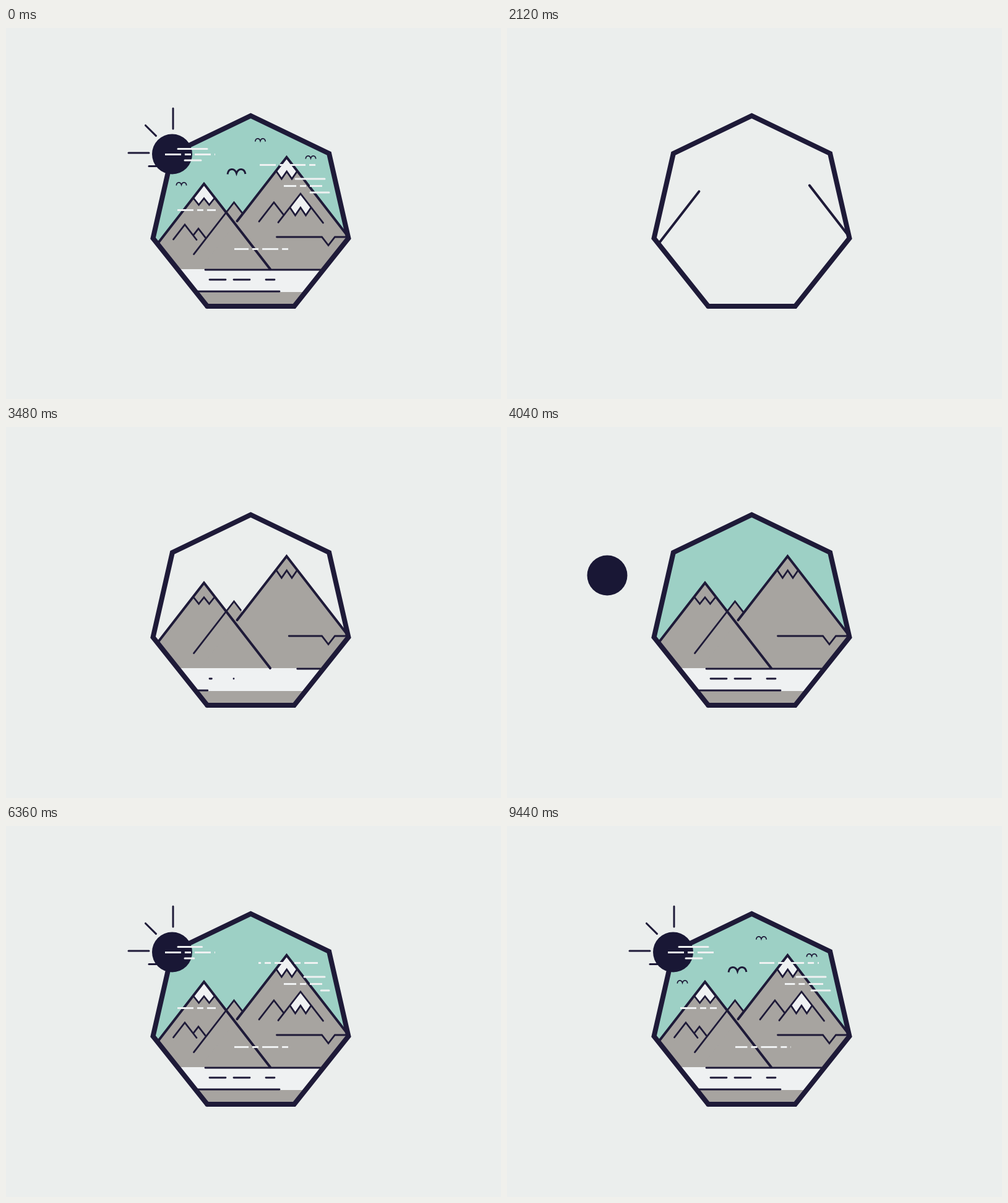
An HTML page with a canvas for the animation above (9.48 s loop, 800 by 600 pixels).

```html
<!DOCTYPE html>
<html lang="en">
<head>
<meta charset="utf-8">
<title>Mountain badge</title>
<style>
  html, body { margin: 0; width: 100%; height: 100%; overflow: hidden; background: #ebeeed; }
  canvas { display: block; }
</style>
</head>
<body>
<canvas id="stage" width="800" height="600"></canvas>
<script>
const ctx = document.getElementById('stage').getContext('2d');
const LOOP = 9480, CUT = 120;
const BG = '#ebeeed', INK = '#1e1a38', SUN = '#191735';
const ROCK = '#a7a4a0', SKY = '#9dd0c5', WHITE = '#eff1f2';
const SLOPE = 1.29, THICK = 4, THIN = 2.8;
const DASHES = [26, 6, 10, 6], PERIOD = 48;

const clamp = v => Math.max(0, Math.min(1, v));
const span = (t, a, b) => clamp((t - a) / (b - a));
const ease = (t, start, time) => { const p = span(t, start, start + time); return p * p * (3 - 2 * p); };
const mix = (a, b, k) => a + (b - a) * k;

// Every ridge shares one slope; left and right are the horizontal reaches.
const peak = (x, y, left, right) => [[x - left, y + left * SLOPE], [x, y], [x + right, y + right * SLOPE]];
const zigzag = (x, y, step, depth) => [-2, -1, 0, 1, 2].map(i => [x + i * step, y + (i % 2 ? depth : 0)]);
const level = (y, from, to) => [[from, y], [to, y]];

// Regular heptagon, running clockwise from its lower left corner.
const badge = Array.from({ length: 8 }, (_, i) => {
  const angle = (i + 4) * Math.PI * 2 / 7;
  return [395.5 + 162 * Math.sin(angle), 304 - 162 * Math.cos(angle)];
});

const summits = [[320, 252], [453.5, 209], [476, 268]];
const snowEdges = [zigzag(320, 275.5, 8.4, 10.5), zigzag(453.7, 232, 8.3, 12), zigzag(476, 290.5, 8.5, 12.5)];

function trace(points, dy = 0) {
  ctx.beginPath();
  points.forEach(([x, y], i) => i ? ctx.lineTo(x, y + dy) : ctx.moveTo(x, y + dy));
}

function fill(points, color, dy = 0) {
  trace(points, dy);
  ctx.closePath();
  ctx.fillStyle = color;
  ctx.fill();
}

function clipped(points, draw) {
  ctx.save();
  trace(points);
  ctx.clip();
  draw();
  ctx.restore();
}

function pathLength(points) {
  return points.slice(1).reduce((sum, [x, y], i) => sum + Math.hypot(x - points[i][0], y - points[i][1]), 0);
}

// Strokes the part of a polyline between two fractions of its length.
function strokePart(points, from, to, width, color = INK) {
  if (to <= from) return;
  const total = pathLength(points);
  ctx.save();
  ctx.lineWidth = width;
  ctx.strokeStyle = color;
  ctx.lineCap = 'round';
  if (from > 0 || to < 1) {
    ctx.setLineDash([(to - from) * total, total * 3]);
    ctx.lineDashOffset = -from * total;
  }
  trace(points);
  ctx.stroke();
  ctx.restore();
}

function drawOutline(t) {
  const tail = span(t, 440, 2080);
  const head = tail + tail ** 4;
  if (tail === 1) return strokePart(badge, 0, 1, 8);
  strokePart(badge, tail, Math.min(1, head), 8);
  strokePart(badge, 0, head - 1, 8);
}

function drawLand(t) {
  clipped(badge, () => {
    if (t >= 3320) fill(badge, SKY, 250 * (1 - ease(t, 3320, 780)));
    const sink = 240 * (1 - ease(t, 2360, 620));
    for (const [x, y] of [summits[0], [368.5, 282], summits[1]]) fill(peak(x, y, 400, 400), ROCK, sink);
    ctx.fillStyle = t < 3320 ? BG : WHITE;
    ctx.fillRect(200, 390, 400, 37);
  });
}

function drawSnow(t) {
  snowEdges.forEach((edge, i) => {
    const start = 4400 + i * 210;
    const shape = [...edge, summits[i]];
    if (t > start) clipped(shape, () => fill(shape, WHITE, 36 * (1 - ease(t, start, 600))));
  });
}

function drawLines(t) {
  const grow = (points, width, start, time) => strokePart(points, 0, ease(t, start, time), width);
  grow(peak(320, 252, 75, 107), THICK, 1560, 1385);
  grow(peak(453.5, 209, 80, 100).reverse(), THICK, 1560, 1385);
  grow(snowEdges[0], THIN, 2340, 600);
  grow([...snowEdges[1]].reverse(), THIN, 2340, 600);
  grow(peak(368.5, 282, 65, 14), THIN, 2900, 660);

  const river = [[552, 338], [531.5, 338], [521, 351.5], [510.5, 338], [437.5, 338]];
  grow(river, THIN, 3000, 640);
  grow(level(391, 508, 322), THIN, 3320, 560);
  grow(level(426, 310, 442), THIN, 3360, 560);
  [[329, 26], [368, 26], [420, 14]].forEach(([x, w], i) => grow(level(407, x, x + w), THIN, 3400 + i * 80, 360));

  grow(snowEdges[2], THIN, 4440, 560);
  const ridges = [peak(476, 268, 36, 36.5), peak(433, 282, 24, 16), peak(289, 318, 18.5, 19), peak(311, 324.5, 7.5, 11)];
  ridges.forEach((ridge, i) => grow(ridge, THIN, 4280 + i * 50, 600));
}

function drawBirds(t) {
  const spots = [[372.5, 232], [411, 181], [492.5, 209], [283.5, 252]];
  spots.forEach(([x, y], i) => {
    const shown = ease(t, 7160 + i * 160, 560);
    if (!shown) return;
    const scale = i ? 0.57 : 1;
    ctx.save();
    ctx.translate(x, y);
    ctx.scale(scale, scale);
    ctx.strokeStyle = INK;
    ctx.lineWidth = 3;
    ctx.setLineDash([shown * 44, 200]);
    ctx.beginPath();
    ctx.moveTo(-14.5, 4.5);
    ctx.bezierCurveTo(-13, -6, -3, -6, 0, 3);
    ctx.bezierCurveTo(3, -6, 13, -6, 14.5, 4.5);
    ctx.stroke();
    ctx.restore();
  });
}

function drawRays(t) {
  const shown = ease(t, 6120, 220);
  for (let i = 0; i < 3; i++) {
    const angle = -Math.PI / 2 - i * Math.PI / 4;
    const at = r => [270 + r * Math.cos(angle), 202 + r * Math.sin(angle)];
    strokePart([at(39), at(i === 1 ? 63 : 72)], 0, shown, 3);
  }
  strokePart(level(223.5, 246, 231), 0, shown, 3);
}

function drawSun(t) {
  const size = 1.1 * ease(t, 3600, 240) - 0.1 * ease(t, 3840, 160);
  const u = ease(t, 4330, 1890), v = 1 - u;
  const curve = (a, b, c, d) => a * v ** 3 + 3 * b * u * v * v + 3 * c * u * u * v + d * u ** 3;
  ctx.fillStyle = SUN;
  ctx.beginPath();
  ctx.arc(curve(162, 162, 236, 268.5), curve(240, 150, -13, 204), 32.5 * size, 0, Math.PI * 2);
  ctx.fill();
}

// Dashes slide through a window that opens from one side.
function dashedCloud(t, y, from, to, home, laps) {
  const tip = mix(from, to, ease(t, 4960, 800));
  const left = Math.min(from, tip);
  if (tip === from) return;
  ctx.save();
  ctx.strokeStyle = WHITE;
  ctx.lineWidth = 3;
  ctx.setLineDash(DASHES);
  ctx.lineDashOffset = left - home - laps * PERIOD * (t - LOOP) / 3120;
  trace(level(y, left, Math.max(from, tip)));
  ctx.stroke();
  ctx.restore();
}

function drawClouds(t) {
  dashedCloud(t, 204.5, 257, 338, 257, -5);
  dashedCloud(t, 294.5, 277, 339, 277, -5);
  dashedCloud(t, 221.5, 504, 408, 410, 6.5);
  dashedCloud(t, 255.5, 511, 449, 443, 6);
  dashedCloud(t, 357.5, 459, 369, 366, 6);
  const solid = [level(195.5, 278, 325), level(244, 515, 468), level(214, 289, 315), level(266, 522, 492)];
  solid.forEach((line, i) => strokePart(line, 0, ease(t, 5850 + i * 65, 700), 3, WHITE));
}

function draw(t) {
  ctx.fillStyle = BG;
  ctx.fillRect(0, 0, 800, 600);
  for (const layer of [drawLand, drawSnow, drawLines, drawBirds, drawOutline, drawRays, drawSun, drawClouds]) layer(t);
}

const begin = performance.now();
function tick() {
  const t = (performance.now() - begin) % LOOP;
  // The finished scene carries on briefly past the loop point.
  draw(t < CUT ? t + LOOP : t);
  requestAnimationFrame(tick);
}
tick();
</script>
</body>
</html>
```
